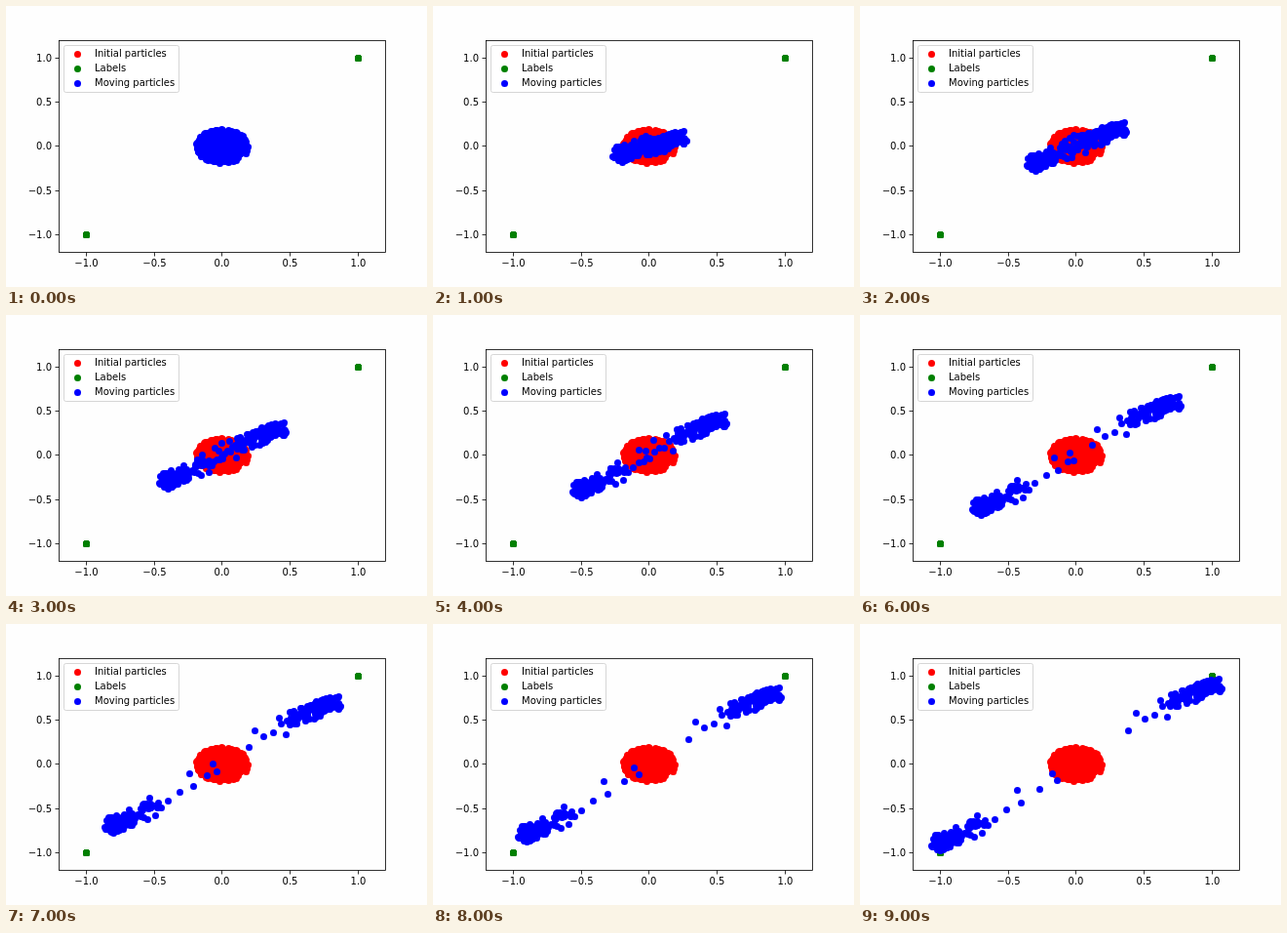
Animation, 432 px wide and 288 px high, one loop 10 s. Source, as an HTML page with a canvas:

```html
<!DOCTYPE html>
<html>
<head>
<meta charset="utf-8">
<style>
  html, body { margin: 0; width: 100%; height: 100%; overflow: hidden; background: #fefefe; }
  canvas { display: block; }
</style>
</head>
<body>
<canvas id="stage" width="432" height="288"></canvas>
<script>
const ctx = document.getElementById('stage').getContext('2d');
const STEP_MS = 1000, STEPS = 10, LAST = STEPS - 1;
const RED = '#ff0000', GREEN = '#008000', BLUE = '#0000ff';

// Plot units to pixels; marks sit on pixel centres.
const px = x => 221.4 + 139.5 * x;
const py = y => 143.4 - 90.6 * y;
const snap = v => Math.round(v) + 0.5;

let seed = 11;
function rand() {
  seed = (seed * 16807) % 2147483647;
  return seed / 2147483647;
}

function inDisc(rx, ry) {
  const a = rand() * Math.PI * 2, r = Math.sqrt(rand());
  return { x: rx * r * Math.cos(a), y: ry * r * Math.sin(a) };
}

const cloud = Array.from({ length: 450 }, () => inDisc(0.193, 0.193));

// End positions: a few stragglers, then two mirrored groups with thinning tails.
const ends = [
  [0.385, 0.38], [0.44, 0.58], [0.505, 0.51], [0.58, 0.555], [0.62, 0.72], [0.67, 0.535],
  [-0.175, -0.105], [-0.14, -0.185], [-0.27, -0.285], [-0.43, -0.295], [-0.405, -0.44],
  [-0.51, -0.515], [-0.6, -0.62], [-0.73, -0.58]
].map(([x, y]) => ({ x, y }));
for (let i = 0; i < 220; i++) {
  const side = i % 2 ? 1 : -1, tail = rand() ** 2, p = inDisc(0.066, 0.096);
  ends.push({
    x: side * (1.013 - 0.34 * tail) + p.x,
    y: side * (0.893 - 0.21 * tail) + p.y
  });
}

const movers = ends.map(({ x, y }) => {
  const w = 1.5 * x + 0.5 * y;
  const k = Math.min(5, Math.max(3.2, 4 * Math.abs(w) - 0.8));
  return { x, y, w, k };
});

// Diagonal drift with speed 0.1 * tanh(k * w), solved back from the end.
function moverAt({ x, y, w, k }, step) {
  const now = Math.asinh(Math.sinh(k * w) * Math.exp(0.2 * k * (step - LAST))) / k;
  const d = (now - w) / 2;
  return { x: x + d, y: y + d };
}

function disc(x, y, color) {
  ctx.fillStyle = color;
  ctx.beginPath();
  ctx.arc(snap(x), snap(y), 3.5, 0, Math.PI * 2);
  ctx.fill();
}

const dot = (p, color) => disc(px(p.x), py(p.y), color);

function line(x1, y1, x2, y2) {
  ctx.beginPath();
  ctx.moveTo(x1, y1);
  ctx.lineTo(x2, y2);
  ctx.stroke();
}

function drawAxes() {
  ctx.strokeStyle = ctx.fillStyle = '#000';
  ctx.lineWidth = 0.8;
  ctx.strokeRect(54.5, 35.5, 335, 217);
  for (let v = -1; v <= 1; v += 0.5) {
    const label = v.toFixed(1).replace('-', '\u2212');
    const x = snap(px(v)), y = snap(py(v));
    line(x, 252.5, x, 256.5);
    line(50.5, y, 54.5, y);
    ctx.textAlign = 'center';
    ctx.fillText(label, x, 267);
    ctx.textAlign = 'right';
    ctx.fillText(label, 47, y + 3.5);
  }
}

function drawLegend() {
  ctx.beginPath();
  ctx.roundRect(59.5, 40.5, 118, 48, 2);
  ctx.fillStyle = 'rgba(255,255,255,0.8)';
  ctx.fill();
  ctx.strokeStyle = 'rgba(204,204,204,0.8)';
  ctx.lineWidth = 1;
  ctx.stroke();
  ctx.textAlign = 'left';
  [['Initial particles', RED], ['Labels', GREEN], ['Moving particles', BLUE]].forEach(([text, color], i) => {
    disc(73, 49 + i * 15, color);
    ctx.fillStyle = '#000';
    ctx.fillText(text, 91, 52 + i * 15);
  });
}

function draw(step) {
  ctx.fillStyle = '#fefefe';
  ctx.fillRect(0, 0, 432, 288);
  ctx.font = '10px "DejaVu Sans", sans-serif';
  cloud.forEach(p => dot(p, step ? RED : BLUE));
  // Stacked labels harden the edge.
  for (let i = 0; i < 20; i++) {
    dot({ x: 1, y: 1 }, GREEN);
    dot({ x: -1, y: -1 }, GREEN);
  }
  if (step) movers.forEach(m => dot(moverAt(m, step), BLUE));
  drawAxes();
  drawLegend();
}

const start = performance.now();
function tick() {
  draw(Math.floor((performance.now() - start) / STEP_MS) % STEPS);
  requestAnimationFrame(tick);
}
tick();
</script>
</body>
</html>
```
